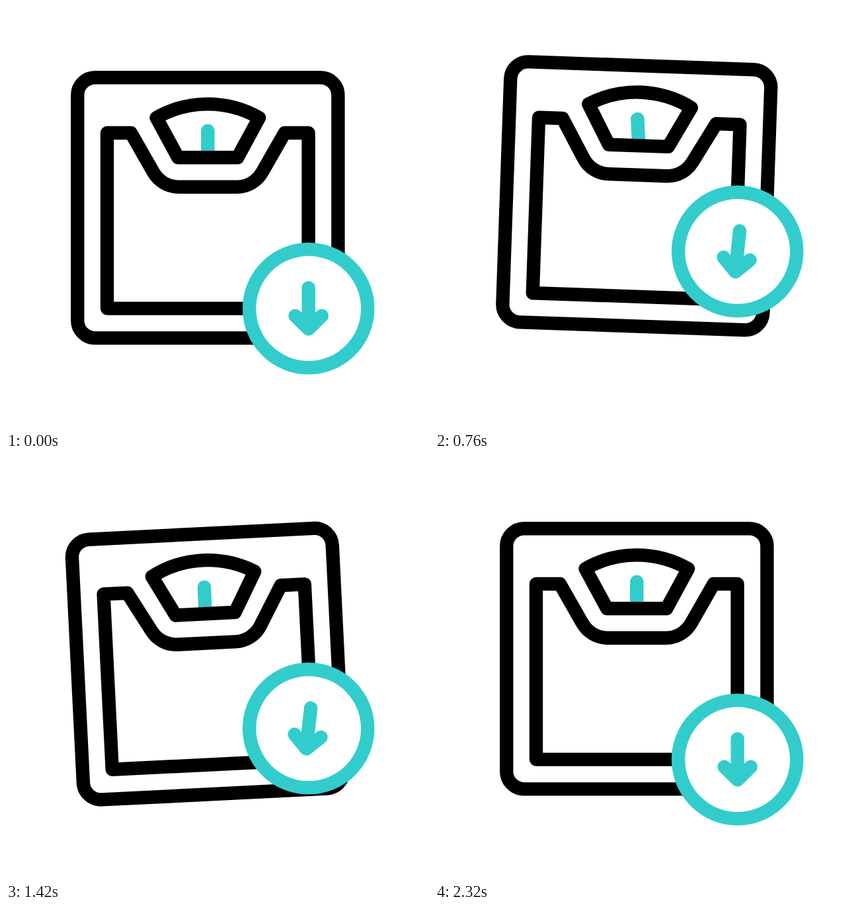
An HTML page for the animation above (2400 ms loop, 640 by 640 pixels).

```html
<!DOCTYPE html>
<html lang="en">
<head>
<meta charset="utf-8">
<title>Weight loss scale</title>
<style>
  :root {
    --accent: #33cccc;
    --smooth: cubic-bezier(.333, 0, .667, 1);
    --in: cubic-bezier(.333, 0, .667, 0);
    --out: cubic-bezier(.333, .667, .667, 1);
  }
  html, body { margin: 0; width: 100%; height: 100%; overflow: hidden; background: #fff; }
  svg { display: block; width: 100%; height: 100%; }
  g, path, rect, circle {
    fill: none;
    stroke-width: 20.4;
    stroke-linecap: round;
    stroke-linejoin: round;
  }
  g, .needle {
    animation-duration: 2400ms;
    animation-iteration-count: infinite;
    animation-timing-function: var(--smooth);
  }
  .scale { stroke: #000; transform-origin: 305.3px 305.3px; animation-name: scale-shift, scale-tilt; }
  .needle { stroke: var(--accent); stroke-linecap: butt; transform-origin: 305.3px 225px; animation-name: needle-swing; }
  .badge { stroke: var(--accent); animation-name: badge-shift; }
  .badge circle { fill: #fff; }
  .arrow { transform-origin: 457.7px 457.7px; animation-name: arrow-swing; }

  @keyframes scale-shift {
    0%, 12.5% { translate: 0 0; }
    31.875% { translate: 0 -18px; }
    43.75% { translate: 0 18.2px; animation-timing-function: var(--out); }
    90.625%, 100% { translate: 0 0; }
  }
  @keyframes scale-tilt {
    0%, 5% { rotate: 0deg; }
    25%, 31.875% { rotate: 2deg; }
    43.333% { rotate: -4deg; }
    87.917%, 100% { rotate: 0deg; }
  }
  @keyframes needle-swing {
    0%, 3.333% { rotate: 0deg; }
    26.667% { rotate: -38.5deg; }
    37.5% { rotate: 37deg; }
    55.833% { rotate: 0deg; }
    75% { rotate: 9deg; }
    96.667%, 100% { rotate: 0deg; }
  }
  @keyframes badge-shift {
    0% { translate: 0 0; }
    12.5% { translate: 0 0; animation-timing-function: var(--in); }
    23.958% { translate: 0 27.5px; }
    35.417% { translate: 0 -123.6px; animation-timing-function: cubic-bezier(.333, .39, .667, .75); }
    84.583% { translate: 0 19.5px; animation-timing-function: var(--out); }
    96.667%, 100% { translate: 0 0; }
  }
  @keyframes arrow-swing {
    0%, 3.333% { rotate: 0deg; }
    25.833% { rotate: 8.5deg; }
    50.833% { rotate: -9.3deg; }
    60.417% { rotate: 7deg; }
    87.5%, 100% { rotate: 0deg; }
  }
</style>
</head>
<body>
<svg viewBox="0 0 640 640">
  <g class="scale">
    <rect x="108.2" y="108.2" width="394.2" height="394.2" rx="26.7"/>
    <path d="M153 192H189L223 251.5A44 44 0 0 0 261 273.7H349.6A44 44 0 0 0 387.6 251.5L421.6 192H457.6V457.6H153Z"/>
    <g class="needle">
      <path d="M305.3 225V189"/>
      <circle cx="305.3" cy="189" r="10.2" style="fill: var(--accent); stroke: none"/>
    </g>
    <path d="M227.5 169A156.8 156.8 0 0 1 383.1 169L350.3 229.3H260.3Z"/>
  </g>
  <g class="badge">
    <circle cx="457.7" cy="457.7" r="89.6"/>
    <g class="arrow">
      <path d="M457.7 426.5V488.5M437.6 468.7L457.7 488.5L477.8 468.7"/>
    </g>
  </g>
</svg>
</body>
</html>
```
